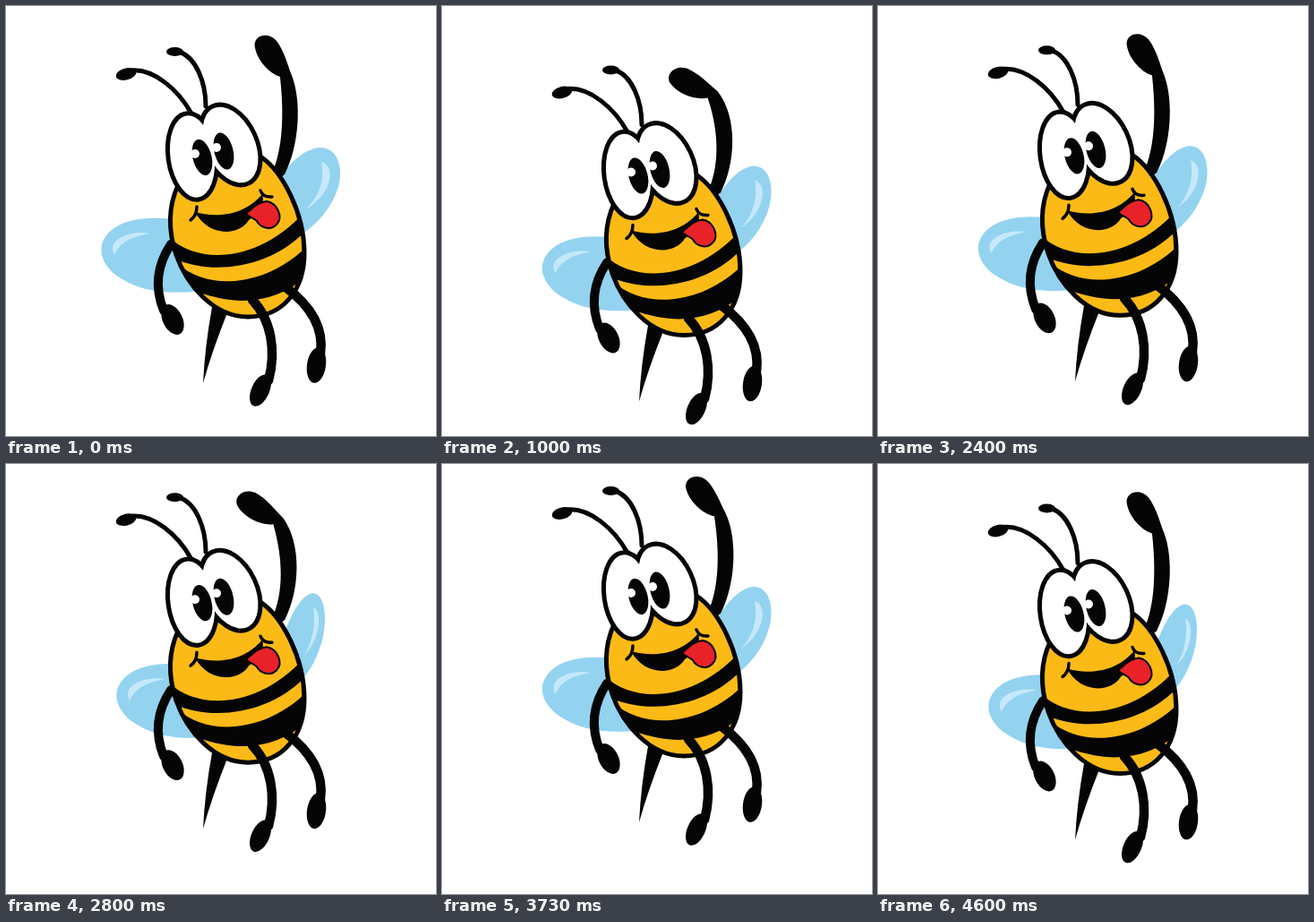
Recreate the animation shown at these times as an HTML page. Size 480 px wide and 480 px high, loop 4.67 s.

```html
<!DOCTYPE html>
<html lang="en">
<head>
<meta charset="utf-8">
<title>Waving bee</title>
<style>
html, body { margin: 0; width: 100%; height: 100%; overflow: hidden; background: #fff; }
svg { display: block; width: 100vw; height: 100vh; }
.line { fill: none; stroke: #050505; stroke-linecap: round; stroke-linejoin: round; }
.wing { fill: #93d3f0; }
.shine { fill: #c5e8fa; }
</style>
</head>
<body>
<svg viewBox="0 0 480 480">
  <defs>
    <path id="egg" d="M192 200C182 222 180 248 190 278C202 312 232 347 270 347C310 347 333 316 333 276C333 230 308 184 284 168L230 170Z"/>
    <clipPath id="inside"><use href="#egg"/></clipPath>
    <g id="eyes">
      <ellipse cx="208" cy="168" rx="24.500" ry="46" transform="rotate(-8 208 168)"/>
      <ellipse cx="250.500" cy="155" rx="27" ry="45" transform="rotate(-25 250.500 155)"/>
    </g>
  </defs>
  <g id="bee" fill="#050505">
    <g id="wingL">
      <path class="wing" d="M200 240C165 234 135 236 118 250C100 265 104 285 122 300C145 317 175 322 210 319Z"/>
      <path class="shine" d="M121 278C111 260 140 250 161 254C143 257 128 262 121 278Z"/>
    </g>
    <g id="wingR">
      <path class="wing" d="M300 200C312 180 330 160 350 158C373 158 377 185 370 205C362 228 345 246 325 258Z"/>
      <path class="shine" d="M352 174C368 178 366 208 335 227C350 211 356 195 352 174Z"/>
    </g>
    <path d="M230 336L248 340Q230 385 220 421Q222 380 230 336Z"/>
    <path class="line" stroke-width="10" d="M184 266C168 290 166 315 176 340"/>
    <ellipse cx="186" cy="350" rx="11" ry="18" transform="rotate(-26 186 350)"/>
    <path id="arm"/>
    <use href="#egg" fill="#fbba16"/>
    <g clip-path="url(#inside)">
      <path d="M180 256C210 288 280 290 335 228L336 249C300 290 235 302 190 283Z"/>
      <path d="M192 288C225 318 290 314 336 268L334 303C305 328 265 338 214 319Z"/>
    </g>
    <use href="#egg" class="line" stroke-width="5"/>
    <path class="line" stroke-width="10.500" d="M275 328C296 350 302 385 293 418"/>
    <ellipse cx="284" cy="429" rx="10" ry="19" transform="rotate(24 284 429)"/>
    <path class="line" stroke-width="10.500" d="M311 313C341 335 355 360 351 388"/>
    <ellipse cx="346.500" cy="401" rx="10.500" ry="20" transform="rotate(8 346.500 401)"/>
    <path class="line" stroke-width="5" d="M140 72C165 70 192 93 207 120M193 51C212 57 223 85 223 112"/>
    <ellipse cx="134" cy="76" rx="11.500" ry="6.500" transform="rotate(-14 134 76)"/>
    <ellipse cx="188.500" cy="51" rx="9.500" ry="5"/>
    <use href="#eyes" class="line" stroke-width="10"/>
    <use href="#eyes" fill="#fff"/>
    <ellipse cx="219" cy="169" rx="10.500" ry="20.500" transform="rotate(-14 219 169)"/>
    <ellipse cx="243" cy="162" rx="10.500" ry="21" transform="rotate(-14 243 162)"/>
    <g fill="#fff">
      <ellipse cx="211" cy="165" rx="5" ry="5"/>
      <ellipse cx="235" cy="158" rx="5" ry="5"/>
    </g>
    <path d="M211 230C232 236 264 236 286 210C290 222 280 233 271 239C260 257 226 258 211 230Z"/>
    <path class="line" stroke-width="3.500" d="M206 239Q213 234 213 224M284 206Q287 214 297 213"/>
    <path d="M268 232C276 225 281 219 291 218C303 220 310 236 302 244C294 252 283 246 280 240C277 237 272 236 268 232Z" fill="#e92229" stroke="#050505" stroke-width="2"/>
  </g>
</svg>
<script>
const LOOP = 4670, FRAMES = 70, STEP = 200 / 3;
const el = id => document.getElementById(id);
const bee = el('bee'), arm = el('arm'), wingL = el('wingL'), wingR = el('wingR');
const clamp = x => Math.max(0, Math.min(1, x));
const mix = (a, b, x) => a + (b - a) * clamp(x);

// sink at an even pace, rise above the middle, sink back
const LOW = 28.7, HIGH = -30, TURN = 21, TOP = 50;
function bob(k) {
  if (k < TURN) return mix(0, LOW, k / TURN);
  if (k < TOP) return mix(LOW, HIGH, (k - TURN) / (TOP - TURN));
  return mix(HIGH, 0, (k - TOP) / (FRAMES - TOP));
}

// the forearm swings out and back around each beat
const beats = [5, 15, 26, 41, 52, 60];
function wave(k) {
  const near = Math.min(...beats.map(b => Math.abs(k - b)));
  return mix(1, -.1, near / 5);
}

// two steps open, two steps tucked
const tuck = k => Math.min(5.5, k / 2) + 5.75 * (1 + Math.SQRT2 * Math.cos(Math.PI * (k - 1.5) / 2));

const raised = 'M298 184C308 160 311 125 305 79C292 76 277 60 275 45C275 33 290 30 299 39C308 49 313 66 318 77C330 105 328 155 311 188L300 196Z';
const ELBOW = { x: 307, y: 98 }, SWING = 27 * Math.PI / 180;

// points above the elbow turn about it, those below stay
function armPath(w) {
  return raised.replace(/(\d+) (\d+)/g, (_, px, py) => {
    const a = w * SWING * clamp((110 - py) / 30);
    const x = px - ELBOW.x, y = py - ELBOW.y, c = Math.cos(a), s = Math.sin(a);
    return `${(ELBOW.x + x * c + y * s).toFixed(2)} ${(ELBOW.y - x * s + y * c).toFixed(2)}`;
  });
}

function draw(ms) {
  const t = Math.floor((ms % LOOP) / 10) * 10 + 5;
  const k = Math.min(FRAMES - 1, Math.floor(t / STEP));
  const u = tuck(k);
  bee.setAttribute('transform', `translate(0 ${bob(k).toFixed(2)})`);
  arm.setAttribute('d', armPath(wave(k)));
  wingL.setAttribute('transform', `translate(${u.toFixed(2)} 0)`);
  wingR.setAttribute('transform', `translate(330 0) scale(${(1 - u / 43).toFixed(4)} 1) translate(-330 0)`);
}

const start = performance.now();
function tick() {
  draw(performance.now() - start);
  requestAnimationFrame(tick);
}
tick();
</script>
</body>
</html>
```
